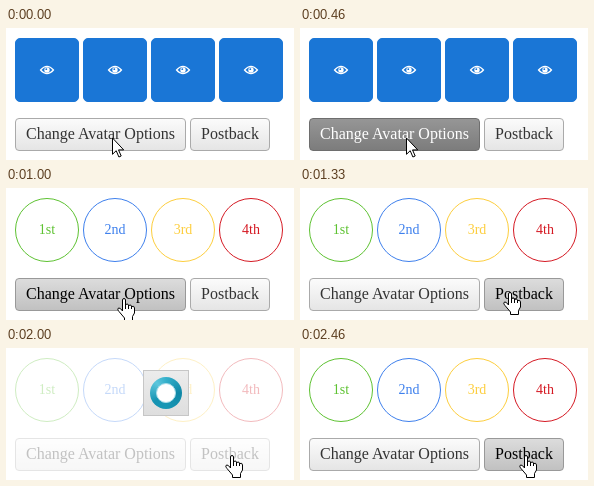
Recreate the animation shown at these times as an HTML page. Size 288 px wide and 132 px high, loop 3.13 s.

```html
<!DOCTYPE html>
<html lang="en">
<head>
<meta charset="utf-8">
<title>Avatar options</title>
<style>
  html, body {
    margin: 0;
    width: 100%;
    height: 100%;
    overflow: hidden;
    background: #fff;
  }
  body { position: relative; font-family: "Liberation Serif", "Times New Roman", serif; }
  body * { box-sizing: border-box; position: absolute; }

  .avatar, .avatar svg, .btn, .veil, .loader, .ring, .arrow, .hand {
    animation: 3130ms step-end infinite;
  }

  .avatar {
    top: 10px;
    width: 64px;
    height: 64px;
    border: 1px solid;
    font-size: 14px;
    line-height: 61px;
    text-align: center;
    animation-name: avatar;
  }
  .avatar svg { left: 23px; top: 23px; animation-name: eye; }
  @keyframes avatar {
    0% { background: #1a76d6; border-color: #1a76d6; border-radius: 5px; color: transparent; }
    16.93%, 100% { background: #fff; border-color: var(--c); border-radius: 50%; color: var(--c); }
  }
  @keyframes eye {
    0% { visibility: visible; }
    16.93%, 100% { visibility: hidden; }
  }

  .btn {
    top: 90px;
    height: 33px;
    border: 1px solid #aaa;
    border-radius: 4px;
    font-size: 16px;
    line-height: 30px;
    text-align: center;
    white-space: nowrap;
    color: #333;
    background: linear-gradient(#fbfbfb, #e5e5e5);
    --hover: linear-gradient(#dcdcdc, #c1c1c1);
    --press: linear-gradient(#969696, #7c7c7c);
  }
  .change { left: 9px; width: 171px; animation-name: change; }
  .post { left: 184px; width: 80px; animation-name: post; }
  @keyframes change {
    1.91% { background: var(--hover); color: #000; border-color: #999; }
    14.69% { background: var(--press); color: #fff; border-color: #6e6e6e; }
    16.93% { background: var(--hover); color: #000; border-color: #999; }
    40.25% { background: linear-gradient(#fbfbfb, #e5e5e5); color: #333; border-color: #aaa; }
  }
  @keyframes post {
    40.25% { background: var(--hover); color: #000; border-color: #999; }
    51.11% { background: var(--press); color: #fff; border-color: #6e6e6e; }
    57.50% { background: var(--hover); color: #000; border-color: #999; }
    59.42% { background: linear-gradient(#fbfbfb, #e5e5e5); color: #333; border-color: #aaa; }
    78.59%, 100% { background: var(--hover); color: #000; border-color: #999; }
  }

  .veil { inset: 0; background: rgba(255, 255, 255, .7); animation-name: veil; }
  @keyframes veil {
    0%, 78.59%, 100% { visibility: hidden; }
    57.50% { visibility: visible; }
  }
  .loader {
    left: 137px;
    top: 22px;
    width: 46px;
    height: 46px;
    border: 1px solid #c6c6c6;
    background: linear-gradient(#ececec, #dedede);
    animation-name: loader;
  }
  @keyframes loader {
    0%, 78.59%, 100% { visibility: hidden; }
    59.42% { visibility: visible; }
  }
  .ring {
    left: 6px;
    top: 6px;
    width: 32px;
    height: 32px;
    border-radius: 50%;
    background: conic-gradient(#35b0cb, #0f87a6 25%, #1797b5 50%, #1593b2 65%, #5cc6dc 88%, #35b0cb);
    animation-name: spin;
  }
  .hole {
    left: 12px;
    top: 12px;
    width: 20px;
    height: 20px;
    border: 1px solid #a9dce8;
    border-radius: 50%;
    background: #fff;
  }
  @keyframes spin {
    0% { transform: rotate(-30deg); }
    63.89% { transform: rotate(0deg); animation-timing-function: steps(7); }
    78.59%, 100% { transform: rotate(210deg); }
  }

  .arrow { left: 106px; top: 109px; animation-name: arrow; }
  @keyframes arrow {
    0% { visibility: visible; }
    19.16%, 100% { visibility: hidden; }
  }
  .hand { left: 0; top: 0; animation-name: hand; }
  @keyframes hand {
    0% { visibility: hidden; transform: translate(101px, 110px); }
    19.16% { visibility: visible; transform: translate(101px, 110px); }
    31.94% { visibility: visible; transform: translate(111px, 110px); }
    33.86% { visibility: visible; transform: translate(125px, 109px); }
    36.10% { visibility: visible; transform: translate(146px, 107px); }
    38.33% { visibility: visible; transform: translate(169px, 105px); }
    40.25% { visibility: visible; transform: translate(188px, 104px); }
    42.49% { visibility: visible; transform: translate(203px, 104px); }
    44.72% { visibility: visible; transform: translate(214px, 106px); }
    46.64%, 100% { visibility: visible; transform: translate(219px, 107px); }
  }
</style>
</head>
<body>
<svg width="0" height="0">
  <symbol id="eye" viewBox="0 0 16 16">
    <path d="M1.5 8Q8 .8 14.500 8Q8 15.200 1.500 8Z" fill="none" stroke="#fff" stroke-width="1.2"/>
    <circle cx="8" cy="8" r="2.700" fill="#fff"/>
    <circle cx="7.300" cy="7.200" r=".9" fill="#1a76d6"/>
  </symbol>
</svg>

<div class="avatar" style="left:9px;--c:#5ec232">1st<svg width="16" height="16"><use href="#eye"/></svg></div>
<div class="avatar" style="left:77px;--c:#3e80ed">2nd<svg width="16" height="16"><use href="#eye"/></svg></div>
<div class="avatar" style="left:145px;--c:#fdce3e">3rd<svg width="16" height="16"><use href="#eye"/></svg></div>
<div class="avatar" style="left:213px;--c:#d51923">4th<svg width="16" height="16"><use href="#eye"/></svg></div>

<div class="btn change">Change Avatar Options</div>
<div class="btn post">Postback</div>

<div class="veil"></div>
<div class="loader"><div class="ring"></div><div class="hole"></div></div>

<svg class="arrow" width="14" height="22" fill="#fff" stroke="#000">
  <path d="M.5 1v16.300l3.700-3.600 2.700 6.300 2.300-1-2.700-6.100h5.200z"/>
</svg>
<svg class="hand" width="19" height="24" fill="#fff" stroke="#000">
  <path d="M5.500 13V2Q5.500.5 7 .5T8.500 2V6.500Q11.500 5 11.500 7.500Q14.500 6 14.500 8.500Q17.500 7.500 17.500 10V15L15.500 18.500V22.500H7.500V20L2 13.500Q-.5 10.500 2 10Q3.500 10 5.500 13Z"/>
  <path d="M8.500 6v5M11.500 7v4M14.500 8v3" fill="none"/>
</svg>
</body>
</html>
```
